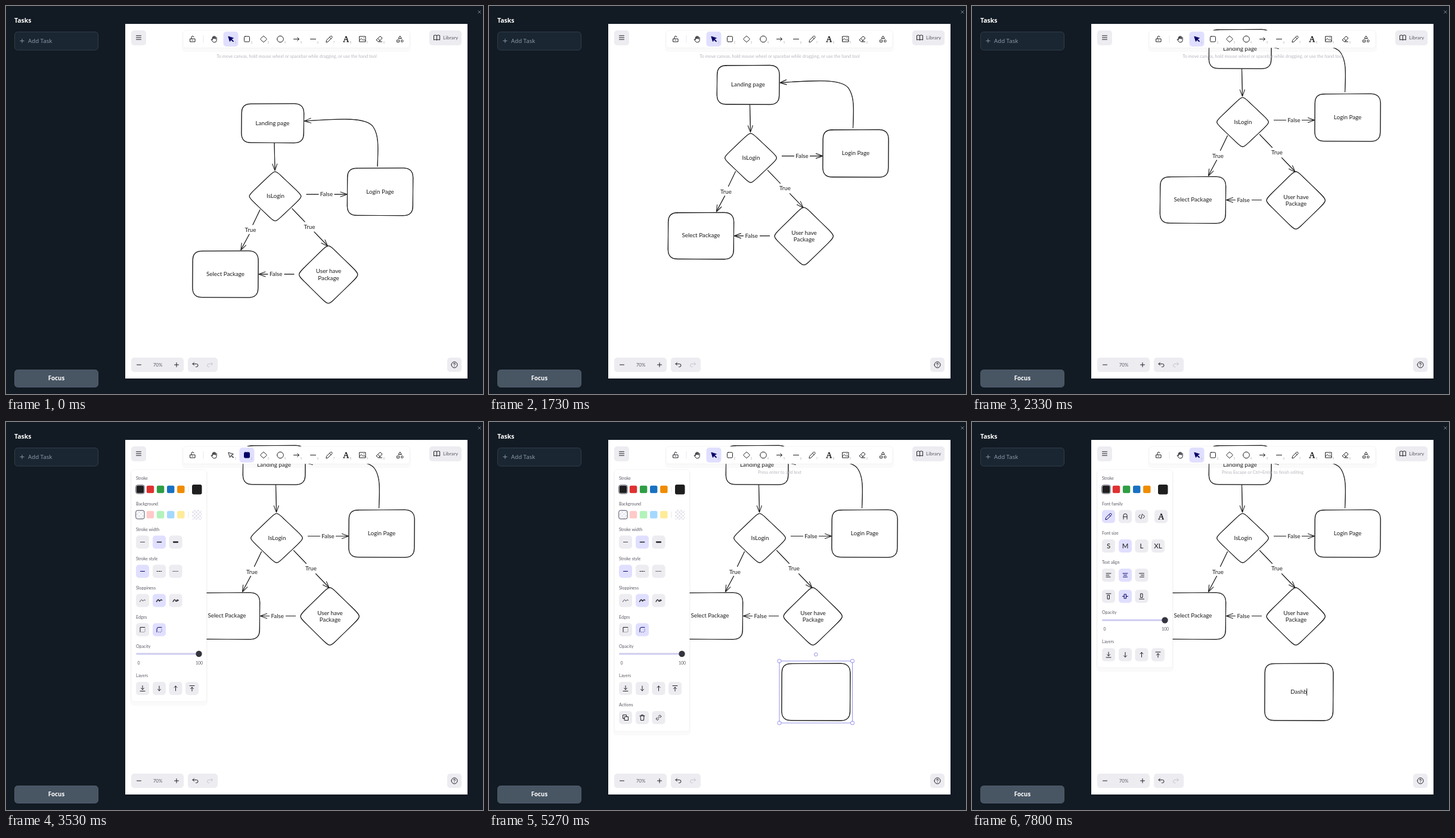
These frames come from a looping animation (800 px wide and 651 px high, 8 s). An HTML page:

```html
<!DOCTYPE html>
<html lang="en">
<head>
<meta charset="utf-8">
<title>Flowchart board</title>
<style>
html, body { margin: 0; width: 100%; height: 100%; overflow: hidden; background: #121a23; }
svg { display: block; width: 100vw; height: 100vh; }
text { font-family: Lato, sans-serif; white-space: pre; }
.side { font-family: "Noto Sans", sans-serif; }
.bold { font-weight: 700; }
.ic { fill: none; stroke: #1f1f25; stroke-width: 1; stroke-linecap: round; stroke-linejoin: round; }
.on { stroke: #030064; }
.ink { fill: none; stroke: #1e1e1e; stroke-linecap: round; stroke-linejoin: round; }
</style>
</head>
<body>
<svg id="stage" viewBox="0 0 800 651" preserveAspectRatio="none"></svg>
<script>
const LOOP = 8000, INK = '#1e1e1e', BTN = '#ececf1', SEL = '#e0dfff', LABEL = '#5b5b66', RULE = '#e8e8ee';
const $ = id => document.getElementById(id);

const box = (x, y, w, h, r, fill, more = '') =>
  `<rect x="${x}" y="${y}" width="${w}" height="${h}" rx="${r}" fill="${fill}" ${more}/>`;
const text = (x, y, s, size, fill, anchor = 'start', more = '') =>
  `<text x="${x}" y="${y + size * .36}" font-size="${size}" fill="${fill}" text-anchor="${anchor}" ${more}>${s}</text>`;
const icon = (x, y, d, more = '') =>
  `<path class="ic" transform="translate(${x} ${y})" d="${d}" ${more}/>`;
const group = (id, body, more = '') => `<g id="${id}" ${more}>${body}</g>`;

// Hand-drawn shapes: two slightly different passes
const rough = make => [[0, 1.1], [.5, .75]].map(([j, w]) =>
  `<path class="ink" stroke-width="${w}" d="${make(j)}"/>`).join('');

const roundRect = (x, y, w, h) => rough(j => {
  const r = Math.min(Math.min(w, h) / 4, 15.7), k = Math.min(j, h / 20);
  return `M${x + r} ${y + k}L${x + w - r} ${y - k}Q${x + w} ${y} ${x + w + k} ${y + r}` +
    `L${x + w - k} ${y + h - r}Q${x + w} ${y + h} ${x + w - r} ${y + h + k}` +
    `L${x + r} ${y + h - k}Q${x} ${y + h} ${x - k} ${y + h - r}L${x + k} ${y + r}Q${x} ${y} ${x + r} ${y + k}Z`;
});

// a and b reach to the sharp corners, before rounding
const diamond = (cx, cy, a, b) => rough(j => {
  const u = a / 4, v = b / 4, l = cx - a, r = cx + a, t = cy - b, d = cy + b;
  return `M${cx + u} ${t + v + j}L${r - u} ${cy - v - j}C${r} ${cy} ${r} ${cy} ${r - u + j} ${cy + v}` +
    `L${cx + u} ${d - v - j}C${cx} ${d} ${cx} ${d} ${cx - u} ${d - v + j}` +
    `L${l + u} ${cy + v - j}C${l} ${cy} ${l} ${cy} ${l + u - j} ${cy - v}` +
    `L${cx - u} ${t + v - j}C${cx} ${t} ${cx} ${t} ${cx + u} ${t + v + j}Z`;
});

const arrow = (d, x, y, deg) =>
  rough(() => d) +
  `<path class="ink" stroke-width="1.1" transform="translate(${x} ${y}) rotate(${deg})" d="M-11 -4Q-5 -2 0 0Q-5 2 -11 4"/>`;

const note = (x, y, s) => text(x, y, s, 9.8, INK, 'middle');

const chart =
  roundRect(395, 164, 104.5, 65.5) + roundRect(572.5, 272, 110, 79.5) + roundRect(313, 411, 110, 78) +
  diamond(451.5, 319.3, 46.2, 44) + diamond(540.7, 450.6, 52.4, 51.4) +
  arrow('M450 230Q450.5 250 451 275', 451, 276, 89) +
  arrow('M504 316H524M551 316H571', 572, 316, 0) +
  arrow('M623 269C624 240 626 218 616 203C605 186 560 189 501 193', 500.5, 193, 176) +
  arrow('M426 342L414 367M408 383L394 409', 394, 409.5, 116) +
  arrow('M480 340L501 362M517 379L539 402', 539.5, 403, 47) +
  arrow('M483 450H467M439 450H424.5', 424, 450, 180) +
  note(447, 196, 'Landing page') + note(452, 318.5, 'IsLogin') + note(627.5, 311, 'Login Page') +
  note(368, 449, 'Select Package') + note(541, 444.5, 'User have') + note(541, 456, 'Package') +
  note(537.5, 315.5, 'False') + note(452.7, 449.7, 'False') + note(410, 375.5, 'True') + note(509, 370, 'True');

const PENCIL = 'M-5 5L-4.5 2L2.5 -5Q4 -5.500 5 -4Q5.500 -3 4.500 -2L-2 4.500ZM1 -3L3.500 -.5';
const LETTER = 'M-4.500 4.500H-1.500M1.500 4.500H4.500M-3.500 4.500L0 -4.500H1L4 4.500M-2 1H2.500M0 -4.500L3 4.500';
const CURSOR = 'M-4 -4L-1.500 4L0 1L4 4.500L4.500 3.500L1 0L4 -1.500Z';
const SQUARE = 'M-3 -4.500H3Q4.500 -4.500 4.500 -3V3Q4.500 4.500 3 4.500H-3Q-4.500 4.500 -4.500 3V-3Q-4.500 -4.500 -3 -4.500Z';
const TOOLS = [
  [313, 'M-4 -.5H4V4.500H-4ZM-2 -.5V-3Q-2 -5 0 -5Q1.800 -5 2 -3.500M0 1.500V2.300'],
  [349, 'M-2.500 1V-3.500Q-1.800 -4.500 -1 -3.500V-.5V-4.500Q0 -5.500 .7 -4.500V-.5V-4Q1.500 -5 2.400 -4V0V-2.500Q3.300 -3.500 4.200 -2.500V2Q4 5.500 .5 5.500Q-2 5.500 -3 3.500L-5 .5Q-4.500 -1 -2.500 1'],
  [377, CURSOR],
  [404, SQUARE],
  [432, 'M-.8 -4.800Q0 -5.500 .8 -4.800L4.800 -.8Q5.500 0 4.800 .8L.8 4.800Q0 5.500 -.8 4.800L-4.800 .8Q-5.500 0 -4.800 -.8Z'],
  [460, 'M-5.300 0A5.300 5.300 0 1 1 5.300 0A5.300 5.300 0 1 1 -5.300 0'],
  [487, 'M-4.500 0H4.500M1.500 -2.800L4.500 0L1.500 2.800'],
  [515, 'M-4.500 0H4.500'],
  [542, PENCIL],
  [570, LETTER],
  [598, 'M-5 -4.500H5V4.500H-5ZM-5 2L-2 -1L1 2L2.500 .5L5 3M2 -2H2.300'],
  [626, 'M-1.500 4.500L-5 1.500L1 -4.500H2L5 -1.500L-1 4.500H4.500M-2.500 -1L2 3'],
  [661, 'M0 -5L2.500 -1H-2.500ZM-5 1.500H-1.500V5H-5ZM1.500 3.200A1.800 1.800 0 1 1 5.100 3.200A1.800 1.800 0 1 1 1.500 3.200']
];

// White card with a see-through shadow
const card = (x, y, w, h) =>
  box(x - 2, y + 1, w + 4, h + 6, 6, '#000', 'opacity=".018"') +
  box(x, y, w, h, 5, '#fff', 'stroke="#000" stroke-opacity=".05" stroke-width=".8"');

const toolbar =
  card(297, 41, 380, 29.3) +
  `<path d="M331 49V62" stroke="${RULE}"/>` +
  box(0, 43, 25, 25, 5, '#f1f0ff', 'id="hover"') + box(0, 43, 25, 25, 5, SEL, 'id="pick"') +
  TOOLS.map(([x, d], i) => icon(x, 55.5, d, `id="tool${i}"`) +
    (i > 1 && i < 12 ? text(x + 8, 61.5, (i - 1) % 10, 5, '#b4b4bd', 'middle') : '')).join('');

const frame =
  text(14, 24.5, 'Tasks', 10.5, '#fff', 'start', 'class="side bold"') +
  box(14.5, 43.5, 140, 30.5, 5, '#1a2632', 'stroke="#2f3e4d"') +
  '<path d="M23.500 58.500H30.500M27 55V62" stroke="#8794a2" fill="none"/>' +
  text(37, 58.5, 'Add Task', 9.7, '#8b98a6', 'start', 'class="side"') +
  box(14.5, 610.5, 140, 29, 5, '#485563', 'stroke="#4d5d6c"') +
  text(84.5, 625, 'Focus', 9.7, '#fff', 'middle', 'class="side bold"') +
  '<path d="M791.500 7.500L796.500 12.500M796.500 7.500L791.500 12.500" stroke="#78808a"/>' +
  box(200, 30, 574, 595, 0, '#fff');

const controls =
  box(210, 41, 25, 25, 5, BTN) + icon(222.5, 53, 'M-4 -3.200H4M-4 0H4M-4 3.200H4') +
  box(710, 41, 54, 25, 5, BTN) +
  icon(722.5, 53, 'M0 -3.500Q-2.500 -5 -5 -3.500V4Q-2.500 2.500 0 4Q2.500 2.500 5 4V-3.500Q2.500 -5 0 -3.500V4') +
  text(733, 53, 'Library', 8.3, LABEL) +
  box(210, 590, 88, 24, 5, BTN) + icon(223, 602, 'M-3.500 0H3.500') + icon(286, 602, 'M-3.500 0H3.500M0 -3.500V3.500') +
  text(254.5, 602, '70%', 8, LABEL, 'middle') +
  box(305, 590, 50, 24, 5, BTN) +
  icon(317.5, 602, 'M-2 -4L-4.500 -1.500L-2 1M-4.500 -1.500H2Q4.500 -1.500 4.500 1Q4.500 3.500 2 3.500H1') +
  icon(342, 602, 'M2 -4L4.500 -1.500L2 1M4.500 -1.500H-2Q-4.500 -1.500 -4.500 1Q-4.500 3.500 -2 3.500H-1', 'style="stroke:#c6c6ce"') +
  box(740, 590, 24, 24, 5, BTN) +
  icon(752, 602, 'M-5 0A5 5 0 1 1 5 0A5 5 0 1 1 -5 0M-1.500 -1.300Q-1.300 -2.700 0 -2.700Q1.600 -2.600 1.500 -1.200Q1.300 -.3 0 .6M0 2.500V2.600');

// Property panels
const COLS = [229, 257, 284.5, 312];
const label = (y, s) => text(218, y, s, 7.1, LABEL);
const button = (x, y, d, on) => box(x - 11, y - 11, 22, 22, 5, on ? SEL : BTN) +
  (d[0] === '<' ? `<g transform="translate(${x} ${y})">${d}</g>` : icon(x, y, d, on ? 'style="stroke:#030064"' : ''));
const row = (y, list, sel = -1) => list.map((d, i) => button(COLS[i], y, d, i === sel)).join('');
const heavy = (d, w, dash = '') => `<path class="ic" style="stroke-width:${w};stroke-dasharray:${dash || 'none'}" d="${d}"/>`;
const glyph = s => text(0, 0, s, 11.5, INK, 'middle');

const swatches = (y, fills, last) =>
  fills.map((c, i) => box(218.7 + i * 17.1, y - 6.2, 12.4, 12.4, 2.5, c)).join('') +
  box(217.7, y - 7.2, 14.4, 14.4, 3, 'none', 'stroke="#3d3d55" stroke-width=".9"') +
  `<path d="M306 ${y - 5}v10" stroke="${RULE}"/>` + box(312, y - 8, 16.5, 16.5, 3, last);
const strokes = label(94, 'Stroke') + swatches(113, [INK, '#e03131', '#2f9e44', '#1971c2', '#f08c00'], INK);
const sheet = h => card(210, 80, 126.5, h);
const opacity = y => label(y, 'Opacity') + box(218, y + 11.5, 110, 3, 1.5, '#cfcdf0') +
  `<circle cx="323.500" cy="${y + 13}" r="5.200" fill="#35353f"/>` +
  text(222.5, y + 28, '0', 7, LABEL, 'middle') + text(324, y + 28, '100', 7, LABEL, 'middle');
const layers = y => label(y, 'Layers') + row(y + 22, [
  'M0 -4.500V2M-2.500 -.5L0 2L2.500 -.5M-4 4.500H4', 'M0 -4V4M-2.500 1.500L0 4L2.500 1.500',
  'M0 4V-4M-2.500 -1.500L0 -4L2.500 -1.500', 'M0 4.500V-2M-2.500 .5L0 -2L2.500 .5M-4 -4.500H4']);

const DASH = 'M-3.500 0H3.500', WAVE = 'M-4.500 2Q-2 -3 -.5 -.5Q0 2 1.500 0Q2.500 -2 4.500 -.5';
const shapeRows = strokes + label(137, 'Background') +
  swatches(155.5, ['url(#check)', '#ffc9c9', '#b2f2bb', '#a5d8ff', '#ffec99'], 'url(#check)') +
  label(180, 'Stroke width') + row(201.5, [heavy(DASH, .8), heavy(DASH, 1.6), heavy(DASH, 2.3)], 1) +
  label(229, 'Stroke style') + row(250.5, [DASH, heavy('M-4 0H4', 1.1, '2 1.500'), heavy('M-4.500 0H4.500', 1, '.4 1.600')], 0) +
  label(278, 'Sloppiness') + row(299.5, [heavy(WAVE, .8), heavy(WAVE, 1.5), heavy(WAVE + 'M-4 1Q-1 -4 0 1Q1 2 4.500 0', 1.2)], 1) +
  label(327, 'Edges') + row(348.5, ['M-4 4V-4H4M4 -1V-.8M4 2V2.200M-1 4H-.8M2 4H2.200',
    'M-4 4V-1Q-4 -4 -1 -4H4M4 -1V-.8M4 2V2.200M-1 4H-.8M2 4H2.200'], 1) +
  opacity(376) + layers(425);
const actions = label(474, 'Actions') + row(496, [
  'M-1.500 -1.500H4.500V4.500H-1.500ZM-1.500 1.500H-4.500V-4.500H1.500V-1.500', 'M-4 -3H4M-3 -3L-2.500 4.500H2.500L3 -3M-1.500 -3V-4.500H1.500V-3',
  'M-1.500 1.500L1.500 -1.500M0 -2.500L2 -4.500L4.500 -2L2.500 0M0 2.500L-2 4.500L-4.500 2L-2.500 0']);

const lines = (a, b) => `M${a} -3H${a + 8 * b}M${a} 0H${a + 5 * b}M${a} 3H${a + 7 * b}`;
const textRows = strokes + label(137, 'Font family') +
  row(158.5, [PENCIL, 'M-3 4.500V-2Q-3 -4.500 0 -4.500Q3 -4.500 3 -2V4.500M-3 .5H3', 'M-2.500 -3L-5 0L-2.500 3M2.500 -3L5 0L2.500 3M1 -4L-1 4'], 0) +
  button(317, 158.5, LETTER) +
  label(186, 'Font size') + row(208, ['S', 'M', 'L', 'XL'].map(glyph), 1) +
  label(235, 'Text align') + row(257, [lines(-4, 1), 'M-4 -3H4M-2.500 0H2.500M-3.500 3H3.500', lines(4, -1)], 1) +
  row(292.5, ['M-4 -4.500H4M-1.500 -2H1.500V4.500H-1.500Z', 'M-1.500 -3.500H1.500V3.500H-1.500ZM-4.500 0H-1.500M1.500 0H4.500', 'M-4 4.500H4M-1.500 2H1.500V-4.500H-1.500Z'], 1) +
  opacity(319.5) + layers(368.5);

// Selection outline around the new box
const THIN = 'stroke="#6965db" stroke-width=".7"';
const grip = (x, y) => box(x - 2.8, y - 2.8, 5.6, 5.6, 1.5, '#fff', THIN);
const outline = box(487, 401, 122.5, 104, 0, 'none', THIN) +
  grip(487, 401) + grip(609.5, 401) + grip(487, 505) + grip(609.5, 505) +
  `<circle cx="548.300" cy="390" r="2.800" fill="#fff" ${THIN}/>`;

$('stage').innerHTML =
  '<defs><pattern id="check" width="6" height="6" patternUnits="userSpaceOnUse"><path d="M0 0H6V6H0Z" fill="#fff"/><path d="M0 0H3V3H0ZM3 3H6V6H3Z" fill="#e6e6ee"/></pattern>' +
  '<clipPath id="page"><path d="M200 30H774V625H200Z"/></clipPath></defs>' +
  frame + group('board', group('chart', chart) + group('fresh', '') + group('outline', outline) +
    text(548, 452.5, '', 9.8, INK, 'middle', 'id="typed"') + box(0, 447, .9, 12, 0, INK, 'id="caret"'), 'clip-path="url(#page)"') +
  group('shapePanel', sheet(389) + shapeRows) + group('pickedPanel', sheet(439) + shapeRows + actions) +
  group('textPanel', sheet(332) + textRows) +
  toolbar + text(487.5, 84, '', 7.35, '#b8b8c0', 'middle', 'id="hint"') + controls;

const PAN = [[1400, 0, 0], [1466, -1, 0], [2000, -24, -128.5], [2200, 6, -126], [2333, 2.5, -124.5]];
const DRAG = [[4333, 1.5, .5], [4600, 58, 50], [4933, 103, 114], [5133, 109, 98], [5266, 114.7, 95.7]];
const KEYS = [7060, 7130, 7260, 7330, 7800];
const MOVE = 'To move canvas, hold mouse wheel or spacebar while dragging, or use the hand tool';

function track(keys, t) {
  const i = keys.findIndex(k => k[0] > t);
  if (i < 0) return keys[keys.length - 1].slice(1);
  if (!i) return keys[0].slice(1);
  const [a, b] = [keys[i - 1], keys[i]], p = (t - a[0]) / (b[0] - a[0]), e = p * p * (3 - 2 * p);
  return [1, 2].map(n => a[n] + (b[n] - a[n]) * e);
}

const show = (id, on) => $(id).style.display = on ? '' : 'none';
let lastStep = -1;

function render(ms) {
  const step = Math.floor((ms + 4) * .015);
  if (step === lastStep) return;
  lastStep = step;
  const t = step / .015, within = (a, b) => t >= a && t < b;

  $('chart').setAttribute('transform', `translate(${track(PAN, t)})`);
  $('fresh').innerHTML = t >= 4330 ? roundRect(491, 405.2, ...track(DRAG, t)) : '';

  const drawing = within(3530, 5260), picked = within(5260, 6200), editing = t >= 6260;
  show('shapePanel', drawing);
  show('pickedPanel', picked);
  show('textPanel', editing);
  show('outline', picked);

  const hovered = within(3260, 3330) ? 432 : within(3330, 3530) ? 404 : 0;
  show('hover', hovered);
  $('hover').setAttribute('x', hovered - 12.5);
  $('pick').setAttribute('x', (drawing ? 404 : 377) - 12.5);
  [[2, !drawing], [3, drawing]].forEach(([n, on]) => {
    $('tool' + n).style.fill = on ? '#030064' : 'none';
    $('tool' + n).classList.toggle('on', on);
  });
  $('hint').textContent = drawing ? '' : picked ? 'Press enter to add text'
    : editing ? 'Press Escape or Ctrl+Enter to finish editing' : MOVE;

  const word = 'Dashb'.slice(0, KEYS.filter(k => t >= k).length);
  $('typed').textContent = word;
  show('caret', editing && !within(6860, 7060));
  $('caret').setAttribute('x', 547.5 + (word ? $('typed').getComputedTextLength() / 2 : 0));
}

function tick() {
  render(performance.now() % LOOP);
  requestAnimationFrame(tick);
}
tick();
</script>
</body>
</html>
```
